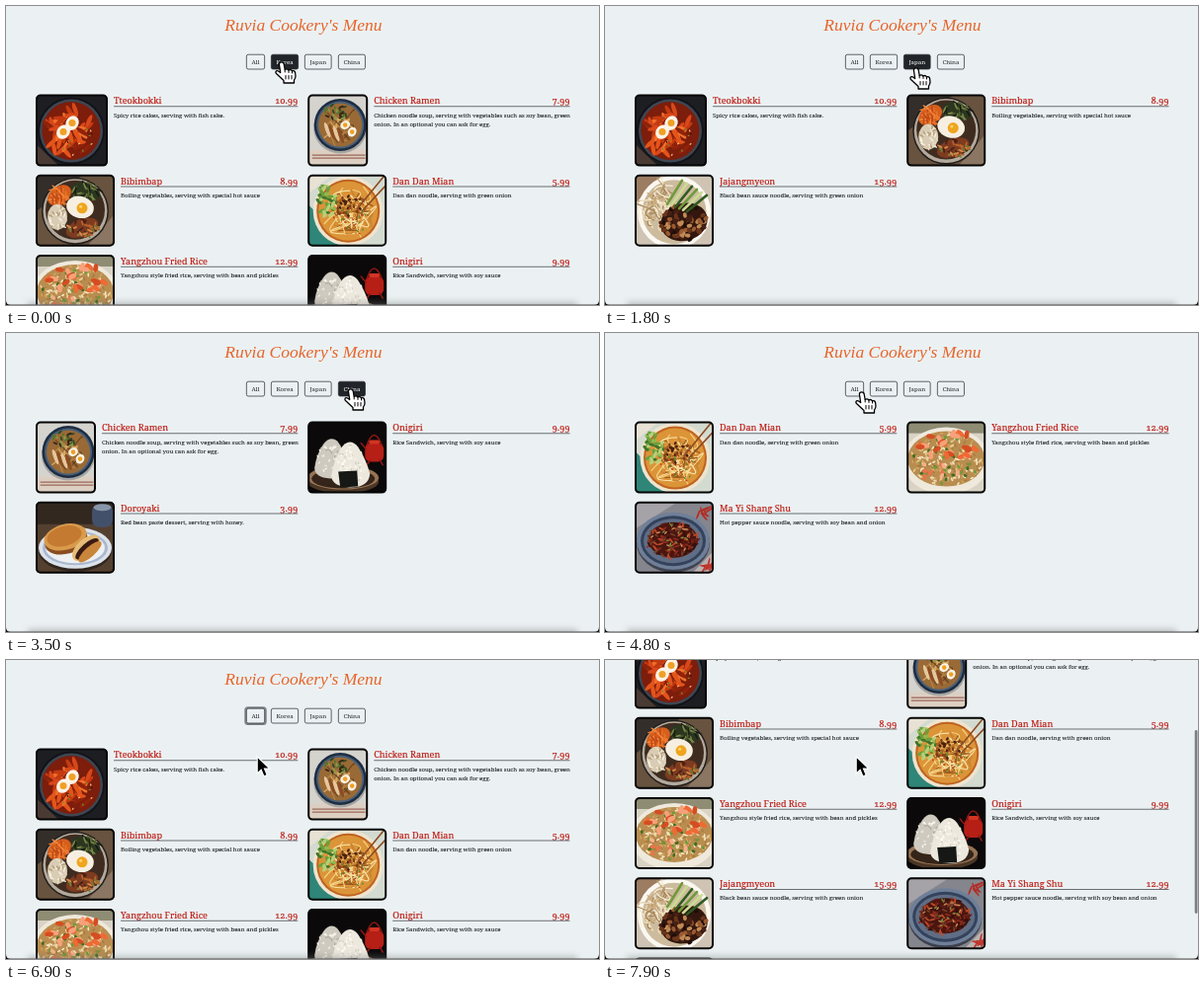
Write an HTML page that moves like this. It is 600 px wide and 303 px high and loops after 8000 ms.

```html
<!DOCTYPE html>
<html lang="en">
<head>
<meta charset="utf-8">
<title>Menu</title>
<style>
  html, body { margin: 0; width: 100%; height: 100%; overflow: hidden; background: #ebf1f3; }
  svg { display: block; width: 100vw; height: 100vh; }
  text { font-family: "Noto Serif", "DejaVu Serif", serif; fill: #212529; }
  .title { font: italic 17.5px "Liberation Serif", "Noto Serif", serif; fill: #e8642a; text-anchor: middle; }
  .name, .price { font-size: 9.05px; fill: #bd1a12; stroke: #bd1a12; stroke-width: .16px; font-variant-numeric: oldstyle-nums; }
  .price { text-anchor: end; }
  .desc { font-size: 6.03px; stroke: #212529; stroke-width: .1px; }
  .btn text { font-size: 6.1px; text-anchor: middle; }
  .shade { filter: blur(3px); }
</style>
</head>
<body>
<svg id="stage" viewBox="0 0 600 303" preserveAspectRatio="none"></svg>
<script>
const LOOP = 8000, STEP = 100, IMG_H = 73, ROW = 81.2;

// ---- drawing helpers -------------------------------------------------
function random(seed) {
  return () => (seed = (seed * 16807) % 2147483647) / 2147483647;
}
const rect = (x, y, w, h, fill, more = '') =>
  `<rect x="${x}" y="${y}" width="${w}" height="${h}" fill="${fill}" ${more}/>`;
const oval = (x, y, rx, ry, fill, turn = 0) =>
  `<ellipse cx="${x}" cy="${y}" rx="${rx}" ry="${ry}" fill="${fill}" transform="rotate(${turn} ${x} ${y})"/>`;
const disc = (x, y, r, fill) => oval(x, y, r, r, fill);
const path = (d, fill) => `<path d="${d}" fill="${fill}"/>`;
const line = (d, stroke, width) =>
  `<path d="${d}" fill="none" stroke="${stroke}" stroke-width="${width}" stroke-linecap="round"/>`;
const egg = (x, y, r, turn = 0) =>
  oval(x, y, r, r * 1.2, '#fbf3e6', turn) + disc(x, y, r * 0.55, '#f0a025');

// Small oval pieces strewn over an ellipse.
function bits(seed, n, x, y, rx, ry, long, thin, colors) {
  const rnd = random(seed * 7919);
  let out = '';
  for (let i = 0; i < n; i++) {
    const a = rnd() * 6.283, d = Math.sqrt(rnd());
    out += oval((x + Math.cos(a) * d * rx).toFixed(1), (y + Math.sin(a) * d * ry).toFixed(1),
      long, thin, colors[i % colors.length], Math.round(rnd() * 180));
  }
  return out;
}
// Curly strands inside an ellipse.
function noodles(seed, n, x, y, rx, ry, colors) {
  const rnd = random(seed * 7919), near = r => ((rnd() * 2 - 1) * r).toFixed(1);
  let out = '';
  for (let i = 0; i < n; i++) {
    const px = x + +near(rx * 0.6), py = y + +near(ry * 0.6);
    out += line(`M${px} ${py}q${near(rx)} ${near(ry)} ${near(rx * 0.7)} ${near(ry * 0.7)}`,
      colors[i % colors.length], 1.2);
  }
  return out;
}

// ---- dish pictures ---------------------------------------------------
const pictures = {
  tteokbokki: () => rect(0, 0, 73, 73, '#1d1e22') + path('M0 50L24 73H0Z', '#4a3a34') +
    disc(36, 37, 34, '#121318') + disc(36, 37, 32, '#3f4652') + disc(36, 37, 29.5, '#7d1d0b') +
    bits(11, 52, 35, 38, 25, 24, 7, 2.2, ['#e4541a', '#c43a10', '#f0702a', '#8f220b', '#d8481a']) +
    bits(5, 18, 38, 42, 22, 20, 1.2, 0.7, ['#6f8c2c', '#f9b878', '#4a0f06']) +
    egg(37, 29, 6.4, 30) + egg(28, 38, 6.4, 40),

  ramen: () => rect(0, 0, 61, 73, '#d5d3ce') + rect(0, 56, 61, 17, '#dccfc2') +
    oval(33, 34, 27, 26, '#a5a4a1') + disc(33, 31, 26.5, '#1d2d42') + disc(33, 31, 24, '#4a6078') +
    disc(33, 31, 22, '#9a6a36') + noodles(8, 18, 33, 33, 18, 18, ['#d8ad65', '#b98444', '#6b431f']) +
    bits(17, 28, 30, 18, 14, 8, 2.6, 1, ['#58732c', '#2e4a24', '#89994a', '#3a2417']) +
    [0, 1, 2, 3].map(i => oval(20 + i * 4.5, 36 + i * 2, 2, 8, i % 2 ? '#8a4d24' : '#e6c79c', -20)).join('') +
    egg(38, 31, 4.2, 60) + egg(45, 38, 4.2, 30) +
    line('M5 61.5H58M5 64.5H58', '#8c4a3d', 1),

  bibimbap: () => rect(0, 0, 80, 73, '#67533f') + path('M0 0H48L0 38Z', '#332e2a') +
    path('M52 73L80 40V73Z', '#8a7662') + disc(40, 37, 34, '#231d1a') + disc(40, 37, 32.5, '#b3aa9d') +
    disc(40, 36, 30, '#3f2c20') +
    oval(24, 21, 13, 9, '#d65f1c', -35) + bits(4, 26, 24, 21, 12, 9, 4, 0.9, ['#f5863a', '#bf4a17', '#e9742a']) +
    oval(51, 17, 15, 8, '#2b3620', 20) + bits(9, 26, 51, 17, 14, 8, 4, 0.9, ['#55642f', '#161d13', '#7a8546']) +
    oval(22, 43, 10, 13, '#d9ccb4') + bits(7, 30, 22, 44, 10, 12, 2.5, 0.8, ['#f7f0e1', '#b59f7d', '#e8dcc4']) +
    oval(47, 54, 17, 9, '#7d3b20', -20) + bits(15, 34, 48, 54, 16, 9, 3, 1, ['#b9622c', '#4a2015', '#6f7a35', '#d9884a']) +
    oval(45, 33, 14, 11, '#f6efe1', 15) + disc(47, 34, 5.5, '#efa51f') + disc(45.6, 32.4, 1.5, '#ffd66c'),

  dandan: () => rect(0, 0, 80, 73, '#d3dad0') + path('M0 73V30L44 73Z', '#2f8577') +
    path('M0 0H25L0 20Z', '#e8e2d4') + disc(41, 37, 35.5, '#efe4cf') + disc(41, 37, 32, '#bf6420') +
    disc(41, 37, 30, '#dc9438') +
    noodles(31, 62, 44, 39, 25, 24, ['#f3d283', '#c98431', '#f8e3a8', '#9c5a20']) +
    bits(6, 34, 20, 26, 9, 16, 3.8, 1.6, ['#6ca03c', '#b7d07a', '#40752b', '#8fb850']) +
    bits(21, 46, 45, 32, 17, 12, 1.8, 1.2, ['#7a3d19', '#a4601f', '#4a200e']) +
    bits(10, 26, 45, 44, 20, 17, 1.3, 0.8, ['#5d8f30', '#c2461a']) +
    line('M50 35L77 2M55 37L80 10', '#8c4c23', 1.6),

  friedRice: () => rect(0, 0, 80, 73, '#d9d3c6') + rect(0, 0, 80, 12, '#8f8c74') +
    oval(40, 40, 44, 34, '#efe9dc') + oval(40, 38, 39, 28, '#b98d50') +
    bits(23, 230, 40, 38, 38, 27, 2, 0.9, ['#e8cd96', '#cfa35c', '#f6e6c2', '#a87a3c']) +
    bits(14, 36, 40, 39, 35, 24, 2, 1.4, ['#6f9a3a', '#3f6c24']) +
    bits(3, 24, 43, 24, 33, 13, 4.4, 2.4, ['#ee6a35', '#f8a07a', '#d44e22']) +
    bits(13, 9, 30, 50, 25, 9, 3, 2, ['#e8744a', '#f3b08b']),

  onigiri: () => rect(0, 0, 80, 73, '#0b090a') + rect(58, 22, 19, 19, '#b51f16', 'rx="6"') +
    line('M60 24Q67 4 75 24M59 28L54 22', '#8f1711', 1.5) + rect(62, 19, 11, 4, '#d33423', 'rx="2"') +
    line('M63 40L59 45M73 39L76 44', '#8f1711', 1.6) +
    oval(36, 61, 36, 12, '#4b3625') + oval(36, 57, 36, 12, '#967455') + oval(36, 58, 32, 10, '#352419') +
    path('M7 47Q9 33 16 23Q23 14 30 20Q37 28 40 46Q38 58 23 58Q7 57 7 47Z', '#cfcabf') +
    bits(18, 40, 22, 38, 12, 16, 1.5, 0.7, ['#ece8de', '#b3aea2', '#faf7ef']) +
    path('M24 55Q26 42 33 28Q42 15 51 26Q59 38 63 53Q62 67 43 67Q24 66 24 55Z', '#ece8dd') +
    bits(12, 70, 43, 44, 15, 20, 1.5, 0.7, ['#fffdf7', '#d3cdbf', '#f6f2e8']) +
    path('M31 51L50 50L51 66L33 67Z', '#151815'),

  blackBean: () => rect(0, 0, 80, 73, '#cfc4b4') + path('M0 0H28L0 30Z', '#9c7d62') +
    disc(40, 38, 37, '#fbf8f2') + disc(40, 38, 32.5, '#cdbb9e') +
    noodles(44, 46, 24, 32, 19, 26, ['#f2e4c4', '#c7a878', '#f8efd9', '#a5855a']) +
    oval(50, 48, 24, 19, '#33170e', -15) +
    bits(26, 66, 49, 49, 24, 18, 2.8, 2, ['#6a351b', '#200d08', '#9a5a32', '#472012', '#c08a55']) +
    [0, 1, 2, 3, 4, 5].map(i => line(`M${33 + i * 4} ${30 + i * 1.5}L${48 + i * 5} ${6 + i * 3}`,
      ['#6f9a3c', '#c9dc92', '#2f5a20'][i % 3], 2.6)).join(''),

  pepper: () => rect(0, 0, 80, 73, '#85858d') + path('M0 0H44L0 28Z', '#a5a3a7') +
    path('M58 73L80 50V73Z', '#b9b2b0') + oval(39, 42, 37, 30, '#3f424f') +
    oval(39, 40, 37, 29, '#6f7f98') + oval(39, 40, 33, 25.5, '#34425c') + oval(39, 40, 30, 22.5, '#5f6d85') +
    oval(39, 39, 25, 18, '#4a1610') +
    bits(29, 115, 39, 39, 26, 18.5, 3.2, 0.9, ['#8f2a1b', '#bd4a2c', '#33100c', '#75402a', '#641a12']) +
    bits(16, 22, 39, 38, 22, 15, 2, 0.7, ['#7c8a3c', '#c89a62']) +
    bits(19, 8, 69, 10, 8, 6, 5, 0.9, ['#b32b24']) + bits(22, 8, 73, 63, 7, 7, 5, 0.9, ['#bd352b']),

  pancake: () => rect(0, 0, 80, 73, '#54402f') + rect(0, 0, 80, 23, '#332820') +
    rect(57, 3, 21, 23, '#43506a', 'rx="7"') + oval(67.5, 6, 9, 3.5, '#8896a9') +
    oval(40, 50, 37, 21, '#30251d') + oval(40, 47, 37, 21, '#dce2ea') + oval(40, 47, 33, 17.5, '#a8b8d0') +
    oval(40, 47, 30, 15.5, '#eef0f1') +
    oval(31, 40, 22, 13, '#8a4d20', -15) + oval(30, 36, 22, 13, '#d99a4c', -15) + oval(29, 35, 18, 10, '#c47b31', -15) +
    oval(51, 47, 17, 9, '#e6bd78', -42) + oval(52, 48, 15, 5.5, '#3a1b14', -42) + oval(55, 51, 15, 5, '#c98539', -42)
};

// ---- page content ----------------------------------------------------
const dishes = [
  ['Tteokbokki', '10.99', 'Korea', 73, 'tteokbokki', 'Spicy rice cakes, serving with fish cake.'],
  ['Chicken Ramen', '7.99', 'Japan', 61, 'ramen',
    'Chicken noodle soup, serving with vegetables such as soy bean, green|onion. In an optional you can ask for egg.'],
  ['Bibimbap', '8.99', 'Korea', 80, 'bibimbap', 'Boiling vegetables, serving with special hot sauce'],
  ['Dan Dan Mian', '5.99', 'China', 80, 'dandan', 'Dan dan noodle, serving with green onion'],
  ['Yangzhou Fried Rice', '12.99', 'China', 80, 'friedRice', 'Yangzhou style fried rice, serving with bean and pickles'],
  ['Onigiri', '9.99', 'Japan', 80, 'onigiri', 'Rice Sandwich, serving with soy sauce'],
  ['Jajangmyeon', '15.99', 'Korea', 80, 'blackBean', 'Black bean sauce noodle, serving with green onion'],
  ['Ma Yi Shang Shu', '12.99', 'China', 80, 'pepper', 'Hot pepper sauce noodle, serving with soy bean and onion'],
  ['Doroyaki', '3.99', 'Japan', 80, 'pancake', 'Red bean paste dessert, serving with honey.']
];

function dishMarkup([name, price, , w, picture, desc], i) {
  const x = w + 6;
  const lines = desc.split('|').map((s, n) => `<text class="desc" x="${x}" y="${23.1 + n * 9.8}">${s}</text>`).join('');
  return `<g class="dish"><clipPath id="clip${i}">${rect(0.5, 0.5, w - 1, IMG_H - 1, '#000', 'rx="4"')}</clipPath>
    <g clip-path="url(#clip${i})">${pictures[picture]()}</g>
    ${rect(1, 1, w - 2, IMG_H - 2, 'none', 'rx="4" stroke="#050505" stroke-width="2"')}
    <text class="name" x="${x}" y="9.7">${name}</text><text class="price" x="265.3" y="9.7">${price}</text>
    ${rect(x, 11.8, 265.3 - x, 0.8, '#4a4e52')}${lines}</g>`;
}

// label, left, width, hover start and end, ring start and end
const buttons = [
  ['All', 243, 19, 4800, 6600, 5600, LOOP],
  ['Korea', 268, 28, -1000, 1450, 400, 1450],
  ['Japan', 302, 27.5, 1600, 3100, 2300, 3100],
  ['China', 336, 27.8, 3250, 4450, 3900, 4450]
];
const buttonMarkup = ([label, x, w]) => `<g class="btn">
  ${rect(x - 0.8, 48.2, w + 1.6, 16.8, 'none', 'class="ring" rx="2.6" stroke="#7d8286" stroke-width="1.8"')}
  ${rect(x + 0.35, 49.2, w - 0.7, 14.8, '#212529', 'class="face" rx="1.8" stroke="#212529" stroke-width=".7"')}
  <text x="${x + w / 2}" y="58.8">${label}</text></g>`;

const stage = document.getElementById('stage');
stage.innerHTML = `
  ${rect(0, 0, 600, 303, '#ebf1f3')}
  <g id="page"><text class="title" x="301" y="24.5">Ruvia Cookery's Menu</text>
    ${buttons.map(buttonMarkup).join('')}${dishes.map(dishMarkup).join('')}</g>
  ${rect(22, 300, 556, 9, '#777', 'class="shade" opacity=".4"')}${rect(0, 302.4, 600, 0.6, '#666')}
  ${path('M0 298Q0 303 5 303H0ZM600 298Q600 303 595 303H600Z', '#111')}
  ${rect(596.7, 0, 2.8, 186, '#7c7f81', 'id="thumb" rx="1.4"')}
  <g id="hand" stroke="#000" stroke-width="1.3" stroke-linejoin="round" stroke-linecap="round">
    <path fill="#fff" d="M-2.6 2Q-2.6 -.2 -.3 -.2Q2 -.2 2.2 2L3.2 7.5Q5.3 6 7 8Q9 6.8 10.5 8.8Q13 8 13.6 10.5L14 14Q14 16.5 12.5 18V21H2V18.5L-5.5 11.5Q-7 9.5 -5 8.7Q-3.5 8.5 -1.3 10.5Z"/>
    <path fill="none" stroke-width="1" d="M3.2 7.5V10M7 8V10.5M10.5 8.8V11M4 13.5V17M7 13.5V17M10 13.5V17"/></g>
  <path id="arrow" fill="#000" stroke="#fff" stroke-width="1.1" d="M0 0V17L4 13.2L6.8 20L10 18.6L7.2 12H12.6Z"/>`;

// ---- motion ----------------------------------------------------------
const pointer = [
  [0, 279, 57], [1300, 279, 57], [1700, 315, 63], [3000, 315, 63], [3400, 349, 57],
  [4200, 349, 57], [4800, 260, 60], [5100, 253, 55.5], [6400, 253, 55.5], [6800, 254.2, 98], [LOOP, 254.2, 98]
];
const scroll = [
  [0, 0], [7100, 0], [7200, 7], [7300, 54.5], [7500, 80], [7700, 99], [7900, 113], [LOOP, 117]
];
const linear = k => k, smooth = k => k * k * (3 - 2 * k);
function sample(track, t, ease) {
  const i = Math.max(1, track.findIndex(p => p[0] > t));
  const a = track[i - 1], b = track[i], k = ease((t - a[0]) / (b[0] - a[0]));
  return a.slice(1).map((v, n) => v + (b[n + 1] - v) * k);
}
const clamp = v => Math.min(1, Math.max(0, v));
const $ = id => document.getElementById(id);
const dishNodes = [...document.querySelectorAll('.dish')];
const buttonNodes = [...document.querySelectorAll('.btn')];
const show = (node, on) => node.setAttribute('visibility', on ? 'visible' : 'hidden');
const move = (node, x, y) => node.setAttribute('transform', `translate(${x} ${y})`);

function category(t) {
  return t < 400 ? 'All' : t < 2300 ? 'Korea' : t < 3900 ? 'Japan' : t < 5600 ? 'China' : 'All';
}
function draw(t) {
  const kind = category(t);
  let slot = 0;
  dishes.forEach((dish, i) => {
    const on = kind === 'All' || dish[2] === kind;
    dishNodes[i].style.display = on ? '' : 'none';
    if (!on) return;
    move(dishNodes[i], slot % 2 ? 305.2 : 30, 89.6 + Math.floor(slot / 2) * ROW);
    slot++;
  });
  buttons.forEach(([, , , from, to, ringFrom, ringTo], i) => {
    const dark = Math.min(clamp((t - from) / 150), 1 - clamp((t - to) / 150));
    const ink = [33, 37, 41].map(v => Math.round(v + (255 - v) * dark));
    const [ring, face] = buttonNodes[i].querySelectorAll('rect');
    show(ring, t >= ringFrom && t < ringTo);
    face.setAttribute('fill-opacity', dark);
    buttonNodes[i].querySelector('text').style.fill = `rgb(${ink})`;
  });
  const [top] = sample(scroll, t, linear);
  move($('page'), 0, -top);
  move($('thumb'), 0, 1.5 + top * 0.615);
  show($('thumb'), t >= 7200);
  const [x, y] = sample(pointer, t, smooth);
  move($('hand'), x, y);
  move($('arrow'), x, y);
  show($('hand'), t < 6600);
  show($('arrow'), t >= 6600);
}

const start = performance.now();
function tick() {
  const t = (performance.now() - start) % LOOP;
  draw(Math.floor(t / STEP) * STEP);
  requestAnimationFrame(tick);
}
tick();
</script>
</body>
</html>
```
